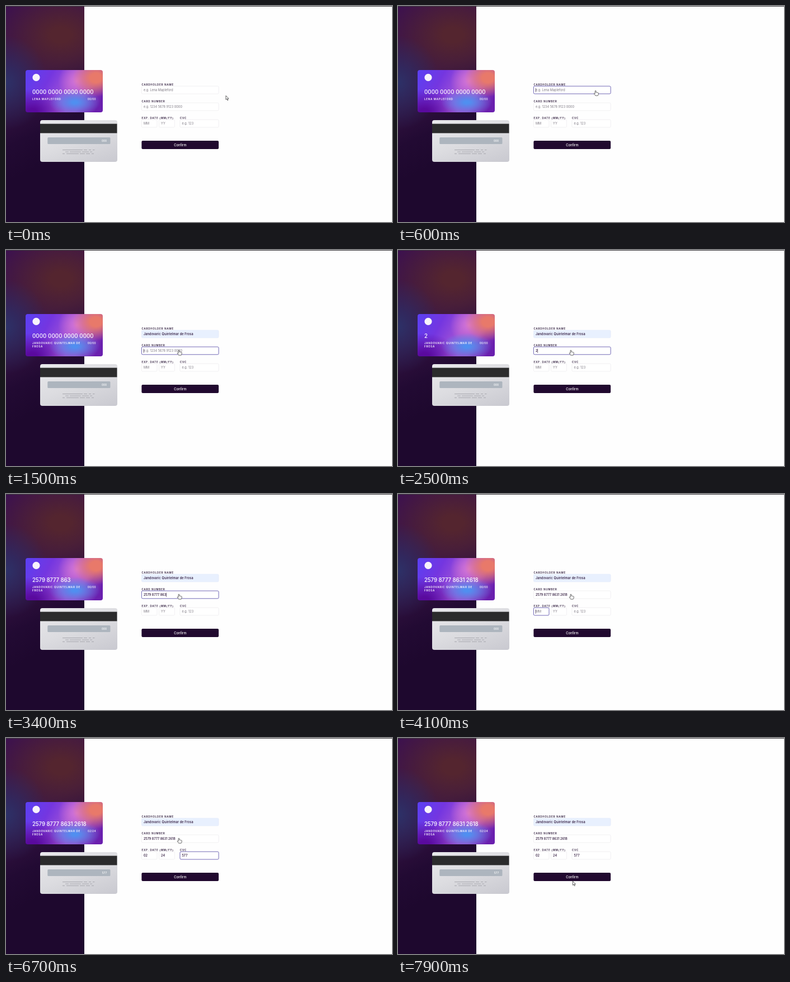
Recreate the animation shown at these times as an HTML page. Size 690 px wide and 388 px high, loop 8 s.

```html
<!DOCTYPE html>
<html lang="en">
<head>
<meta charset="utf-8">
<title>Card details form</title>
<style>
  html, body { margin: 0; width: 100%; height: 100%; overflow: hidden; background: #fefefe; }
  body { position: relative; }
  div, svg { position: absolute; }
  #panel {
    left: 0; top: 0; width: 139.5px; height: 388px;
    background:
      radial-gradient(ellipse 75px 85px at 0 138px, #2d3168, #2d316800),
      radial-gradient(ellipse 120px 90px at 98px 52px, #54252f 15%, #54252f00),
      linear-gradient(155deg, #3c1050 0%, #3a1646 32%, #220a33 56%, #1e082e 70%);
  }
  #bar { left: 0; top: 0; width: 100%; height: 1.4px; background: #3b393d; }
  .card { border-radius: 4px; }
  #front {
    left: 35px; top: 115px; width: 137.5px; height: 76px;
    background:
      radial-gradient(ellipse 42px 34px at 126px 14px, #e8796a 25%, #e8796a00),
      radial-gradient(ellipse 46px 24px at 88px 58px, #508ff0 10%, #508ff000),
      radial-gradient(ellipse 34px 34px at 92px 20px, #d777d6, #d777d600),
      radial-gradient(ellipse 60px 42px at 12px 76px, #5a0a9e 15%, #5a0a9e00),
      linear-gradient(118deg, #5a40f4 0%, #7436e0 28%, #a052d6 52%, #a04bc8 72%, #6a1fae 92%);
  }
  #back {
    left: 61px; top: 205px; width: 137.5px; height: 75.3px;
    background: linear-gradient(160deg, #e9e9ec, #dcdce0 50%, #c9c9d0);
  }
  svg { left: 0; top: 0; }
  text { font-family: Inter, "Open Sans", sans-serif; white-space: pre; }
  .label { font-size: 4.5px; font-weight: 600; letter-spacing: .8px; fill: #2a1738; }
  .value { font-size: 5.6px; font-weight: 500; fill: #21092f; }
  .value.empty { font-weight: 400; fill: #7d7882; }
  .number { font-size: 9.7px; font-weight: 500; fill: #fff; }
  .name { font-size: 4.6px; font-weight: 600; letter-spacing: .7px; fill: #fff; }
  .date { font-size: 4.8px; font-weight: 500; letter-spacing: .15px; fill: #fff; text-anchor: end; }
  .cvc { font-size: 4.8px; font-weight: 500; fill: #fff; text-anchor: end; }
  .print { stroke: #a3a3aa; stroke-width: .9; }
</style>
</head>
<body>
<div id="panel"></div>
<div id="front" class="card"></div>
<div id="back" class="card"></div>
<div id="bar"></div>
<svg id="stage" width="690" height="388" viewBox="0 0 690 388">
  <circle cx="54" cy="128.4" r="6.6" fill="#f7f3fb"/>
  <text id="number" class="number" x="47" y="158.3"></text>
  <text id="name1" class="name" x="47" y="169.3"></text>
  <text id="name2" class="name" x="47" y="175.3"></text>
  <text id="date" class="date" x="160.7" y="169.4"></text>

  <rect x="61" y="211.6" width="137.5" height="16.8" fill="#2b2b2c"/>
  <rect x="74.3" y="236" width="112.2" height="12" rx="1.5" fill="#adb5be"/>
  <text id="cvc" class="cvc" x="180.2" y="243.7"></text>
  <path class="print" d="M101 258.5H158.5" stroke-dasharray="36 2 6 3 4 3"/>
  <path class="print" d="M106 262H154" stroke-dasharray="6 2 20 2 12 2"/>
  <path class="print" d="M101 265.3H158.5" stroke-dasharray="4 3 22 2 9 2 7 3"/>

  <text class="label" x="242.4" y="142.8">CARDHOLDER NAME</text>
  <text class="label" x="242.4" y="172.8">CARD NUMBER</text>
  <text class="label" x="242.4" y="203">EXP. DATE (MM/YY)</text>
  <text class="label" x="311" y="203">CVC</text>
  <g id="fields"></g>
  <line id="caret" stroke="#21092f" stroke-width=".6"/>

  <rect x="242.4" y="242" width="137.8" height="15" rx="2" fill="#21092f"/>
  <text x="311.4" y="251.6" font-size="5.8" font-weight="500" fill="#fff" text-anchor="middle">Confirm</text>

  <g fill="#fff" stroke="#333" stroke-width=".75" stroke-linejoin="round">
    <path id="arrow" d="M0 0V7.2L1.7 5.7L2.9 8.5L4.1 8L2.9 5.3H5.1Z"/>
    <path id="hand" d="M-.9 .6Q0-.9 .9 .6V3.2Q1.9 2.5 2.5 3.4Q3.5 2.9 4 3.8Q5.1 3.5 5.2 4.7V6.6Q5 8 4 9H-.2Q-1.2 7.6-2.7 5.6Q-2.6 4.1-.9 5.3Z"/>
  </g>
</svg>
<script>
const LOOP = 8000, STEP = 100;
const HOLDER = "Jandovaric Quintelmar de Frosa";
const DIGITS = "2579877786312618";
const $ = id => document.getElementById(id);

// Each track lists [start time, value] and holds the value until the next entry.
const held = (track, t) => track.filter(k => k[0] <= t).pop()[1];

const tracks = {
  name: [[0, 0], [700, 1], [900, 2], [1200, HOLDER.length]],
  digits: [[0, 0], [2500, 1], [2600, 2], [2700, 3], [2800, 4], [2900, 5], [3000, 6], [3100, 7],
    [3200, 9], [3400, 11], [3500, 12], [3600, 14], [3800, 16]],
  mm: [[0, ""], [4400, "02"]],
  yy: [[0, ""], [4900, "2"], [5000, "24"]],
  cvc: [[0, ""], [5900, "5"], [6000, "57"], [6100, "577"]],
  focus: [[0, ""], [300, "name"], [1500, "digits"], [4100, "mm"], [4700, "yy"], [5300, "cvc"], [7400, ""]],
  caret: [[0, 1], [1100, 0], [1500, 1], [1800, 0], [2000, 1], [2300, 0], [2500, 1], [5200, 0],
    [5300, 1], [5600, 0], [5900, 1], [6300, 0], [6400, 1], [6700, 0], [6900, 1]]
};

const path = [[0, 393, 161], [100, 356, 152], [800, 352, 152], [1100, 336.5, 169.6], [1500, 309, 180],
  [7000, 309, 180], [7400, 488, 186], [7600, 470, 204], [7800, 330, 266], [7900, 312.4, 257.2], [8000, 312.4, 257.2]];

const fields = {
  name: { x: 242.4, y: 144, w: 137.8, hint: "e.g. Lena Mapleford" },
  digits: { x: 242.4, y: 174, w: 137.8, hint: "e.g. 1234 5678 9123 0000" },
  mm: { x: 242.4, y: 204.2, w: 27.6, hint: "MM" },
  yy: { x: 273.6, y: 204.2, w: 27.8, hint: "YY" },
  cvc: { x: 311, y: 204.2, w: 69.2, hint: "e.g. 123" }
};
const FIELD_H = 13.8;

function make(tag, attrs) {
  const el = document.createElementNS("http://www.w3.org/2000/svg", tag);
  for (const key in attrs) el.setAttribute(key, attrs[key]);
  return $("fields").appendChild(el);
}

for (const f of Object.values(fields)) {
  f.box = make("rect", { x: f.x, y: f.y, width: f.w, height: FIELD_H, rx: 2 });
  f.text = make("text", { x: f.x + 3.5, y: f.y + 8.9 });
}

function drawField(key, value, focused, filled) {
  const f = fields[key];
  f.box.setAttribute("fill", filled ? "#e8f0fe" : "#fff");
  f.box.setAttribute("stroke", focused ? "#6258ae" : filled ? "#e3eaf8" : "#e8e6ea");
  f.box.setAttribute("stroke-width", focused ? .9 : .6);
  f.text.setAttribute("class", value ? "value" : "value empty");
  f.text.textContent = value || f.hint;
}

function drawCaret(key, value, on) {
  const caret = $("caret");
  caret.style.display = key && on ? "" : "none";
  if (!key) return;
  const f = fields[key];
  const x = f.x + 3.8 + (value ? f.text.getComputedTextLength() : 0);
  for (const [attr, v] of Object.entries({ x1: x, x2: x, y1: f.y + 3.4, y2: f.y + 10.8 })) caret.setAttribute(attr, v);
}

function drawPointer(t) {
  const i = path.findIndex(p => p[0] > t);
  const [t0, x0, y0] = path[i - 1], [t1, x1, y1] = path[i];
  const k = (t - t0) / (t1 - t0);
  const x = x0 + (x1 - x0) * k, y = y0 + (y1 - y0) * k;
  const over = Object.values(fields).some(f => x > f.x && x < f.x + f.w && y > f.y && y < f.y + FIELD_H);
  for (const id of ["arrow", "hand"]) {
    $(id).setAttribute("transform", `translate(${x} ${y})`);
    $(id).style.display = over === (id === "hand") ? "" : "none";
  }
}

function drawCards(v) {
  $("number").textContent = v.digits || "0000 0000 0000 0000";
  $("number").style.letterSpacing = v.digits ? "-.11px" : ".1px";
  const upper = (v.typed || "Lena Mapleford").toUpperCase();
  const cut = upper.length > 24 ? upper.lastIndexOf(" ") : upper.length;
  $("name1").textContent = upper.slice(0, cut);
  $("name2").textContent = upper.slice(cut + 1);
  $("date").textContent = `${v.mm || "00"}/${v.yy || "00"}`;
  $("cvc").textContent = v.cvc || "000";
}

function render(t) {
  const now = {};
  for (const key in tracks) now[key] = held(tracks[key], t);
  const preview = t >= 1100 && t < 1200;
  const filled = t >= 1100;
  const v = {
    typed: HOLDER.slice(0, now.name),
    digits: DIGITS.slice(0, now.digits).replace(/(\d{4})(?=\d)/g, "$1 "),
    mm: now.mm, yy: now.yy, cvc: now.cvc
  };
  v.name = preview ? HOLDER : v.typed;
  for (const key in fields) drawField(key, v[key], key === now.focus, key === "name" && filled);
  fields.name.text.style.letterSpacing = v.name && !preview ? ".13px" : "0";
  drawCaret(now.focus, v[now.focus], now.caret);
  drawCards(v);
  drawPointer(t);
}

function tick() {
  const t = performance.now() % LOOP;
  render(Math.floor(t / STEP) * STEP);
  requestAnimationFrame(tick);
}
tick();
</script>
</body>
</html>
```
